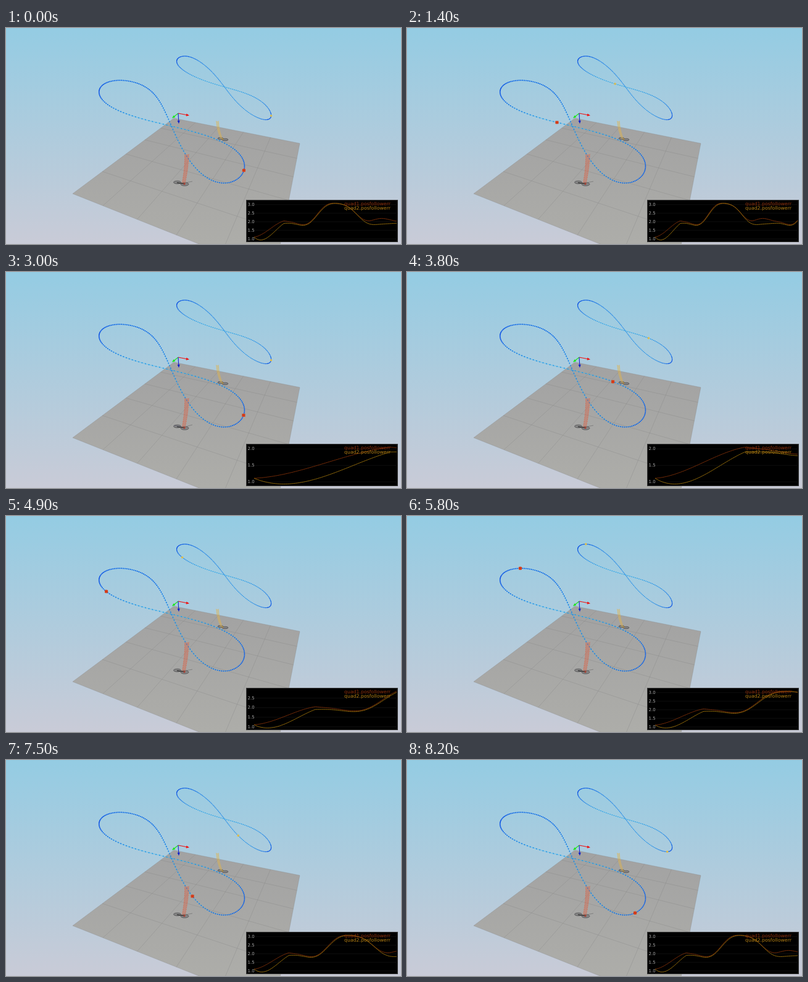
These frames come from a looping animation (640 px wide and 352 px high, 8.3 s). An HTML page with a canvas:

```html
<!DOCTYPE html>
<html lang="en">
<head>
<meta charset="utf-8">
<title>Two quads</title>
<style>
html, body { margin: 0; width: 100%; height: 100%; overflow: hidden; background: #a6cddf; }
canvas { display: block; width: 640px; height: 352px; }
</style>
</head>
<body>
<canvas id="stage" width="640" height="352"></canvas>
<script>
const LOOP = 8300, STEP = 100, RESET = 1500;
const LAP = 5490, CROSS = 2740, JOIN = 1480;
const ctx = document.getElementById('stage').getContext('2d');

// Periodic curve through key values evenly spaced over one lap (trigonometric interpolation).
function cyclic(keys) {
  const n = keys.length;
  return t => keys.reduce((sum, v, k) => {
    const x = 2 * Math.PI * ((t - CROSS) / LAP - k / n), d = Math.tan(x / 2);
    return sum + v * (Math.abs(d) < 1e-6 ? 1 : Math.sin(n * x / 2) / (n * d));
  }, 0);
}

function route(xs, ys) {
  const x = cyclic(xs), y = cyclic(ys);
  return t => [x(t), y(t)];
}

// Eight poses around each figure eight, starting at the crossing.
const near = route([267.5, 164.5, 164.5, 222, 263, 313.5, 377, 369],
                   [159.8, 124.5, 88.5, 94, 148, 234.5, 244.5, 197]);
const far = route([352, 287, 281.5, 311, 347, 384, 426, 414],
                  [95.5, 68.5, 47.5, 53, 87, 130.5, 148.5, 120]);

// Distance error: an eased ramp up to the loop, then one value per lap phase.
function errorCurve(first, m0, m1, keys) {
  const lap = cyclic(keys), last = lap(JOIN);
  return s => {
    if (s >= JOIN) return lap(s);
    const u = s / JOIN, w = 1 - u;
    return first + (last - first) * u * u * (3 - 2 * u) + m0 * u * w * w - m1 * u * u * w;
  };
}
const err1 = errorCurve(1.11, 0.2, 0.5, [1.96, 2.84, 3.07, 2.75, 2.1, 2.18, 2.08, 1.92]);
const err2 = errorCurve(1.11, -1.7, 1.2, [1.92, 2.78, 3.07, 2.75, 2, 1.85, 1.9, 1.86]);

function trace(c, pts) {
  c.beginPath();
  pts.forEach(p => c.lineTo(p[0], p[1]));
}

function line(c, pts, color, width = 1) {
  trace(c, pts);
  c.strokeStyle = color;
  c.lineWidth = width;
  c.stroke();
}

function shape(c, pts, color) {
  trace(c, pts);
  c.closePath();
  c.fillStyle = color;
  c.fill();
}

function disc(c, x, y, rx, ry, color) {
  c.beginPath();
  c.ellipse(x, y, rx, ry, 0, 0, 7);
  c.fillStyle = color;
  c.fill();
}

function rotor(c, x, y, rx, ry) {
  disc(c, x, y, rx, ry, 'rgba(70,70,72,.35)');
  c.strokeStyle = '#505052';
  c.lineWidth = 0.8;
  c.stroke();
}

// Perspective map of the unit square onto the floor.
function floorMap([x0, y0], [x1, y1], [x2, y2], [x3, y3]) {
  const ax = x1 - x2, bx = x3 - x2, sx = x0 - x1 + x2 - x3;
  const ay = y1 - y2, by = y3 - y2, sy = y0 - y1 + y2 - y3;
  const det = ax * by - bx * ay, g = (sx * by - bx * sy) / det, h = (ax * sy - sx * ay) / det;
  return (u, v) => {
    const w = g * u + h * v + 1;
    return [((x1 - x0 + g * x1) * u + (x3 - x0 + h * x3) * v + x0) / w,
            ((y1 - y0 + g * y1) * u + (y3 - y0 + h * y3) * v + y0) / w];
  };
}

function arrow(c, from, to, color) {
  const a = Math.atan2(to[1] - from[1], to[0] - from[0]);
  const tip = (r, b) => [to[0] + r * Math.cos(a + b), to[1] + r * Math.sin(a + b)];
  line(c, [from, tip(-4, 0)], color, 1.1);
  shape(c, [to, tip(-5.5, 0.4), tip(-5.5, -0.4)], color);
}

// Dots evenly spaced in time, brighter where the path is fast.
function dots(c, path, count, size) {
  const pts = Array.from({ length: count + 1 }, (_, i) => path(i * LAP / count));
  const gaps = pts.slice(1).map((p, i) => Math.hypot(p[0] - pts[i][0], p[1] - pts[i][1]));
  const lo = Math.min(...gaps), hi = Math.max(...gaps);
  line(c, pts, 'rgba(50,180,240,.4)', size * 0.6);
  gaps.forEach((gap, i) => {
    const k = (gap - lo) / (hi - lo);
    disc(c, ...pts[i], size / 2, size / 2, `rgb(${10 + 15 * k},${75 + 80 * k},${228 + 4 * k})`);
  });
}

// Dotted lift-off trail along a bowed strip.
function trail(c, from, to, bow, wide, rgb) {
  const side = (k, sign) => [
    from[0] + (to[0] - from[0]) * k + bow * Math.sin(Math.PI * k) + sign * wide * (1 - 0.25 * k),
    from[1] + (to[1] - from[1]) * k];
  const ks = Array.from({ length: 17 }, (_, i) => i / 16);
  shape(c, [...ks.map(k => side(k, -1)), ...ks.slice().reverse().map(k => side(k, 1))], `rgba(${rgb},.4)`);
  for (const k of ks) for (const s of [-1, 1]) disc(c, ...side(k, s), 0.6, 0.6, `rgb(${rgb})`);
}

function scenery() {
  const cv = document.createElement('canvas');
  cv.width = 640;
  cv.height = 352;
  const c = cv.getContext('2d');
  const sky = c.createLinearGradient(0, 0, 0, 352);
  sky.addColorStop(0, '#94cce3');
  sky.addColorStop(1, '#c9cbd7');
  c.fillStyle = sky;
  c.fillRect(0, 0, 640, 352);

  const corners = [[272, 147], [476, 188], [435, 401], [108, 270]];
  const floor = floorMap(...corners);
  const tone = c.createLinearGradient(0, 147, 0, 352);
  tone.addColorStop(0, '#a2a2a2');
  tone.addColorStop(1, '#adada9');
  shape(c, corners, tone);
  for (let i = 0; i <= 5; i++) {
    line(c, [floor(i / 5, 0), floor(i / 5, 1)], 'rgba(125,125,125,.38)', 0.8);
    line(c, [floor(0, i / 5), floor(1, i / 5)], 'rgba(125,125,125,.38)', 0.8);
  }

  arrow(c, [279, 139], [269, 147], '#1ee61e');
  arrow(c, [279, 139], [297, 142.5], '#ee1111');
  arrow(c, [279, 139], [280, 156], '#1122cc');
  dots(c, far, 190, 1.4);
  dots(c, near, 170, 1.9);
  return cv;
}
const backdrop = scenery();

function drones(spin) {
  const c = ctx;
  rotor(c, 277.5, 251.5, 6, 2.4);
  rotor(c, 289.5, 254.5, 6.5, 2.7);
  line(c, [[277, 252], [290, 254]], '#3a3a3a', 1.3);
  line(c, [[291, 252], [302, 250 - spin]], '#777', 0.8);
  disc(c, 289, 254, 1.6, 1.4, '#a33b2e');
  if (spin) line(c, [[272, 249 + spin], [284, 253 - spin]], '#667', 0.8);

  rotor(c, 347.5, 180, 4.5, 1.7);
  rotor(c, 355, 182, 5, 1.8);
  disc(c, 351, 181, 1.4, 1.1, '#b48b34');

  trail(c, [293, 206], [288, 252], 1, 3.2, '222,95,65');
  trail(c, [342.5, 152], [349, 180], -1.2, 1.7, '226,180,75');
}

function markers(phase) {
  const [x, y] = near(phase), [u, v] = far(phase);
  disc(ctx, x, y, 2.7, 2.7, '#e2401a');
  line(ctx, [[x - 2.5, y - 2], [x + 2.5, y + 2]], '#c23a1c');
  line(ctx, [[x - 2.5, y + 2], [x + 2.5, y - 2]], '#c23a1c');
  disc(ctx, u, v, 1.8, 1.8, '#dfbd4c');
}

function chart(s) {
  const c = ctx, span = Math.max(s, 1250), n = 160;
  const samples = Array.from({ length: n + 1 }, (_, i) => {
    const t = s * i / n;
    return [402 + 231 * t / span, err1(t), err2(t)];
  });
  const all = samples.flatMap(p => [p[1], p[2]]);
  const lo = Math.min(...all), hi = Math.max(...all, lo + 0.1);
  const toY = v => 345.5 - (v - lo) * 60 / (hi - lo);

  c.fillStyle = '#000';
  c.fillRect(390, 281, 244, 67);
  c.strokeStyle = '#3c3c3c';
  c.lineWidth = 1;
  c.strokeRect(389.5, 280.5, 245, 68);

  c.font = '7px "DejaVu Sans", sans-serif';
  const step = hi - lo > 0.6 ? 0.5 : hi - lo > 0.3 ? 0.2 : 0.1;
  for (let i = Math.ceil(lo / step); i * step <= hi; i++) {
    const y = toY(i * step);
    line(c, [[403, y], [633, y]], '#141414', 0.8);
    c.fillStyle = '#a8a8a8';
    c.fillText((i * step).toFixed(1), 391.5, y + 2);
  }
  line(c, samples.map(p => [p[0], toY(p[1])]), '#80300a', 0.9);
  line(c, samples.map(p => [p[0], toY(p[2])]), '#9c720c', 0.9);
  c.font = '7.8px "DejaVu Sans", sans-serif';
  c.fillStyle = '#8e300c';
  c.fillText('quad1.posfollowerr', 548, 289);
  c.fillStyle = '#b58014';
  c.fillText('quad2.posfollowerr', 548, 295.5);
}

// Time since the run began; the loop opens late in a run.
const runTime = t => t < RESET ? 7060 + t * 0.932 : t - 1450;

// The first lap starts from rest.
function lapPhase(s) {
  if (s >= 1550) return s;
  const u = s / 1550;
  return 430 + 1120 * u * u * (1.616 - 0.616 * u);
}

function draw(t) {
  const s = runTime(t);
  ctx.drawImage(backdrop, 0, 0);
  drones(t >= RESET && t < 3600 ? 1 + (t / STEP) % 2 : 0);
  markers(lapPhase(s));
  chart(s);
}

const start = performance.now();
function tick() {
  const t = (performance.now() - start) % LOOP;
  draw(Math.floor(t / STEP) * STEP);
  requestAnimationFrame(tick);
}
tick();
</script>
</body>
</html>
```
